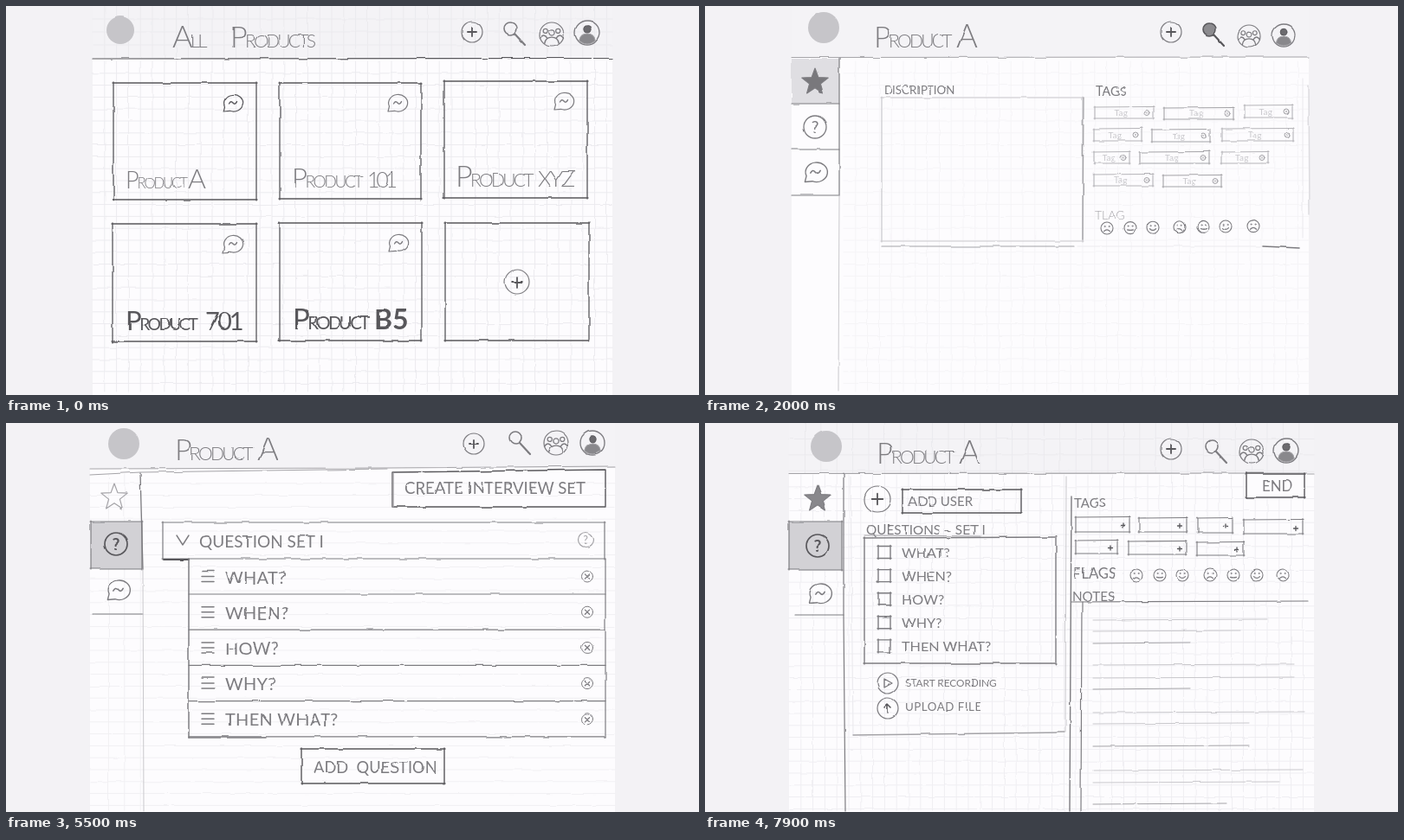
An HTML page for the animation above (8000 ms loop, 800 by 450 pixels).

```html
<!DOCTYPE html>
<html lang="en">
<head>
<meta charset="utf-8">
<title>Product sketch walkthrough</title>
<style>
html, body { margin: 0; width: 100%; height: 100%; overflow: hidden; background: #f3f2f5; }
svg { position: absolute; left: 0; top: 0; width: 800px; height: 450px; }
text { font-family: Lato, "Open Sans", sans-serif; white-space: pre; }
path, circle, ellipse { stroke-linecap: round; stroke-linejoin: round; }
.scene { visibility: hidden; }
</style>
</head>
<body>
<svg id="stage" viewBox="0 0 800 450" xmlns="http://www.w3.org/2000/svg"></svg>
<script>
const LOOP = 8000;
const INK = '#7d7c80', DARK = '#58575b', SOFT = '#a4a3a7', FAINT = '#c9c8cc', GRID = '#ecebef';

// Drawing helpers, each returning SVG markup
const path = (d, c = INK, w = 1.2, fill = 'none') =>
  `<path d="${d}" stroke="${c}" stroke-width="${w}" fill="${fill}"/>`;
const line = (x1, y1, x2, y2, c, w) => path(`M${x1} ${y1}L${x2} ${y2}`, c, w);
const ring = (x, y, r, c = INK, w = 1.2, fill = 'none') =>
  `<circle cx="${x}" cy="${y}" r="${r}" stroke="${c}" stroke-width="${w}" fill="${fill}"/>`;
const fillRect = (x1, y1, x2, y2, c) => `<path d="M${x1} ${y1}H${x2}V${y2}H${x1}Z" fill="${c}"/>`;
const at = (x, y, body, s = 1) => `<g transform="translate(${x} ${y}) scale(${s})">${body}</g>`;
const text = (x, y, size, str, c = INK, weight = 400, gap = 0) =>
  `<text x="${x}" y="${y}" font-size="${size}" fill="${c}" font-weight="${weight}" letter-spacing="${gap}em">${str}</text>`;

// Box with slightly overshooting corners; `tilt` lifts the right side
const box = (x1, y1, x2, y2, c = INK, w = 1.2, tilt = 0) =>
  path(`M${x1 - 1} ${y1}L${x2 + 1} ${y1 - tilt}M${x2} ${y1 - tilt - 1}L${x2} ${y2 + 1}` +
       `M${x2 + 1} ${y2}L${x1 - 1} ${y2}M${x1} ${y2 + 1}L${x1} ${y1 - 1}`, c, w);

const caps = (x, y, size, first, rest, c = INK, weight = 300) =>
  text(x, y, size, `${first}<tspan font-size="${size * 0.62}">${rest}</tspan>`, c, weight, -0.08);

const grid = (x1, y1, x2, y2, dx, dy, c = GRID) => {
  let d = '';
  if (dx) for (let x = x1 + dx; x < x2; x += dx) d += `M${x.toFixed(1)} ${y1}V${y2}`;
  if (dy) for (let y = y1 + dy; y < y2; y += dy) d += `M${x1} ${y.toFixed(1)}H${x2}`;
  return path(d, c, 1);
};

// Icons
const cross = (x, y, r, c, w) => path(`M${x - r} ${y}h${2 * r}M${x} ${y - r}v${2 * r}`, c, w);
const plus = (x, y, r, c = INK) => ring(x, y, r, c) + cross(x, y, r * 0.42, DARK, 1.8);
const remove = (x, y, r, c = INK) =>
  ring(x, y, r, c, 1) + at(x, y, path('M-1 -1L1 1M1 -1L-1 1', c, 0.5), r * 0.4);
const query = (x, y, r, c = INK, w = 1.2, weight = 400) =>
  ring(x, y, r, c, w) +
  `<text x="${x}" y="${y + r * 0.55}" font-size="${r * 1.5}" text-anchor="middle" fill="${c}" font-weight="${weight}">?</text>`;
const bubble = (x, y, c = INK, s = 1) => at(x, y,
  path('M-11 10L-9.5 4A11 9.8 0 1 1 -3.5 9.3Z', c, 1.2) + path('M-4.5 1q2.2 -4 4.5 -1t4.5 -1.4', c, 1.4), s);
const lens = (x, y, c = INK, fill = 'none') =>
  ring(x, y, 7, c, 1.6, fill) + path(`M${x + 5} ${y + 6}l12 13`, c, 2.2);
const star = (x, y, r, c, fill = 'none') => {
  let d = '';
  for (let i = 0; i < 10; i++) {
    const a = i * Math.PI / 5 - Math.PI / 2, q = i % 2 ? r * 0.42 : r;
    d += (i ? 'L' : 'M') + (x + q * Math.cos(a)).toFixed(1) + ' ' + (y + q * Math.sin(a)).toFixed(1);
  }
  return path(d + 'Z', c, 1.2, fill);
};
const group = (x, y, r) => at(x, y,
  ring(0, 0, 13.5) + ring(0, -2, 3) + ring(-7, -4, 2.5) + ring(7, -4, 2.5) +
  path('M-8 10q1 -7 8 -7t8 7M-13 4q4 -6 8 0M13 4q-4 -6 -8 0', INK, 1.4), r / 13.5);
const person = (x, y, r) => at(x, y,
  ring(0, 0, 13.5, INK, 1.3) + ring(0, -4, 4, DARK, 1, '#6c6b6f') +
  path('M-9 9q1 -8 9 -8t9 8q-9 7 -18 0z', SOFT, 1, '#89888c'), r / 13.5);
const face = (x, y, mood, c = INK) => at(x, y,
  ring(0, 0, 7, c, 1.1) + ring(-2.5, -2, 0.6, c, 0.8) + ring(2.5, -2, 0.6, c, 0.8) +
  path(`M-3.5 ${2.6 - mood}q3.5 ${mood * 3.5} 7 0`, c, 1.3));
const faces = (xs, y, slope = 0) =>
  xs.map((x, i) => face(x, y + slope * i, [-1, 0.3, 1][i % 3])).join('');
const tag = (x1, y1, x2, y2, c, mark) => box(x1, y1, x2, y2, c, 1.1, 0.5) + mark(x2 - 8, (y1 + y2) / 2);

// Header items: [x, y] for plus, search, group and profile
const tools = (p, s, g, u, r, lensFill) =>
  plus(...p, 12) + lens(...s, lensFill ? DARK : INK, lensFill) + group(...g, r) + person(...u, r);
const badge = (x, y, r) => `<circle cx="${x}" cy="${y}" r="${r}" fill="#c6c5c9"/>`;
const productTitle = (x, y) => caps(x, y, 34, 'P', 'RODUCT') + text(x + 95, y, 38, 'A', INK, 300);
const sideBar = (x, y, active, [starX, starY], [qx, qy], [bx, by], end, starFill) =>
  active + star(starX, starY, 16, starFill ? INK : SOFT, starFill) +
  query(qx, qy, 13, DARK, 1.7, 700) + bubble(bx, by, INK, 1.15) + line(x + 3, end, y, end, INK, 1.2);

function overview() {
  const cards = [
    [124, 89, 289, 224, 27, 'A', 210, 32, 0], [316, 89, 479, 223, 31, '101', 417, 25, -0.17],
    [506, 87, 671, 222, 34, 'XYZ', 614, 26, -0.08], [123, 252, 289, 388, 31, '701', 230, 29, -0.1],
    [316, 251, 480, 387, 33, 'B5', 425, 32, 0]];
  const left = [138, 330, 519, 138, 331];
  return grid(100, 64, 700, 446, 13.8, 13.8) +
    grid(100, 0, 700, 60, 13.8, 15, '#ebeaee') +
    line(100, 61, 700, 60.5, DARK, 1.2) + badge(132, 28, 16) +
    caps(192, 48, 36, 'A', 'LL', INK, 300) + caps(259, 48, 34, 'P', 'RODUCTS') +
    tools([538, 30], [582, 26], [630, 33], [671, 31], 14) +
    cards.map(([x1, y1, x2, y2, size, name, nx, ns, gap], i) => {
      const c = i > 2 ? DARK : INK, weight = i > 2 ? 400 : 300;
      const y = y2 - 13;
      return box(x1, y1, x2, y2, DARK, 1.3) + bubble(x2 - 27, y1 + 23, i ? INK : DARK) +
        caps(left[i], y, size, 'P', 'RODUCT', c, weight) +
        text(nx, y, ns, name, c, i === 4 ? 700 : weight, gap);
    }).join('') +
    box(507, 251, 673, 387, DARK, 1.3) + plus(590, 319, 14);
}

function details() {
  const mark = (x, y) => remove(x + 1, y, 3, SOFT);
  const tags = [
    [450, 117, 517, 130], [530, 118, 610, 131], [623, 115, 678, 129],
    [449, 142, 504, 156], [516, 143, 583, 157], [597, 142, 679, 156],
    [449, 169, 490, 182], [502, 169, 582, 182], [596, 169, 650, 182],
    [449, 195, 517, 208], [529, 196, 596, 209]];
  return grid(160, 64, 697, 446, 13.8, 13.8, '#f5f4f7') +
    line(100, 59.5, 697, 59, SOFT, 1) + badge(137, 25, 18) + productTitle(195, 48) +
    tools([538, 30], [582, 27], [628, 35], [668, 34], 13, '#8c8b8f') +
    fillRect(100, 61, 155, 113, '#dfdee2') + star(127, 88, 16, INK, '#79787c') +
    query(127, 140, 13, INK, 1.3) + bubble(128, 192, INK, 1.15) +
    [113, 166, 219].map(y => line(100, y, 155, y, INK, 1.1)).join('') +
    line(155, 60, 155, 219, INK, 1.2) + line(155, 219, 154, 445, FAINT, 1) +
    text(206, 102, 13.3, 'DISCRIPTION', INK, 400) +
    box(204, 106, 436, 272, FAINT, 1.2) + line(437, 106, 436, 270, SOFT, 1.3) +
    line(204, 278, 426, 278, SOFT, 1.2) + line(430, 278, 645, 278, GRID, 1) + line(645, 278, 686, 280, INK, 1.6) +
    text(451, 104, 14.5, 'TAGS', INK, 400) +
    tags.map(([x1, y1, x2, y2], i) => tag(x1, y1, x2, y2, i % 3 === 1 ? SOFT : '#b5b4b8', mark) +
      text((x1 + x2) / 2 - 11, y2 - 3, 10, 'Tag', FAINT, 400, 0.03)).join('') +
    text(450, 247, 14, 'TLAG', SOFT, 300) + faces([464, 491, 517, 548, 575, 601, 633], 257, -0.4) +
    line(690, 84, 690, 268, '#e9e8ec', 1) + line(697, 92, 698, 240, '#dddce0', 1.5);
}

const activeCell = (x1, y1, x2, y2) =>
  fillRect(x1, y1, x2, y2, '#d2d1d5') + box(x1, y1, x2, y2, INK, 1.2);

function questionSets() {
  return grid(98, 60, 702, 222, 18.4, 18.4) + grid(98, 0, 702, 57, 18.4, 18.4, '#ebeaee') +
    grid(162, 214, 702, 448, 0, 13.8, '#e8e7eb') +
    line(98, 57, 702, 58.5, INK, 1.1) + badge(136, 22, 18) + productTitle(195, 46) +
    tools([539, 29], [586, 23], [633, 30], [675, 29], 14) +
    sideBar(101, 160, activeCell(100, 114, 158, 172), [125, 84], [129, 142], [133, 197], 225) +
    path('M156 58L159 172L163 449', SOFT, 1.2) + line(156, 58, 159, 172, INK, 1.4) +
    path('M445 62L690 58L690 102L445 102Z', DARK, 1.5) + line(447, 64, 447, 101, SOFT, 1.2) +
    text(460, 89, 18.4, 'CREATE INTERVIEW SET', INK, 400) +
    path('M181 117L685 114L684 156L181 156Z', INK, 1.3) + line(181, 156, 684, 156, DARK, 1.3) +
    path('M196 130L204 137L196 144', DARK, 2) + text(211, 143, 17, 'QUESTION SET I', INK, 400) + query(665, 135, 8.5) +
    path('M184 169L688 174L688 214L184 212Z', INK, 1.3) +
    path('M198 184L207 191L198 199', DARK, 1.5) +
    text(213, 200, 18.2, 'QUESTION SET <tspan font-weight="700">2</tspan>', INK, 400) +
    query(668, 194, 9, INK, 1.4, 700) + ring(535, 171, 0.6, DARK) + ring(567, 214, 0.6, DARK);
}

const QUESTIONS = ['WHAT?', 'WHEN?', 'HOW?', 'WHY?', 'THEN WHAT?'];

function openSet() {
  const rows = QUESTIONS.map((q, i) => {
    const y = 177.5 + i * 41.2;
    return [-6, 0, 6].map(d => line(226, y + d, 240, y + d, INK, 1.5)).join('') +
      text(253, y + 8, 20, q, INK, 400, 0.015) + remove(671, y, 6.5) +
      line(211, y + 20.5, 692, y + 20.5, INK, 1.2);
  }).join('');
  return grid(97, 56, 703, 448, 0, 13.8, '#f1f0f3') + grid(100, 60, 157, 448, 18.4, 0, '#f1f0f3') +
    path('M97 53L440 52L703 50', SOFT, 1.1) + path('M97 60L155 57L440 53', SOFT, 1) +
    badge(136, 24, 18) + productTitle(195, 43) +
    tools([540, 24], [588, 17], [635, 23], [677, 23], 14) +
    sideBar(97, 158, activeCell(98, 114, 157, 169), [125, 86], [127, 140], [130, 193], 221) +
    line(155, 58, 158, 169, INK, 1.3) + line(158, 169, 159, 449, FAINT, 1) +
    path('M446 57L692 54L692 97L446 97Z', DARK, 1.4) + line(447, 58, 447, 97, SOFT, 1.5) +
    text(460, 82, 18.6, 'CREATE INTERVIEW SET', INK, 400) +
    box(181, 115, 691, 157, INK, 1.2) + line(182, 158, 211, 158, DARK, 1.8) +
    path('M197 130L204 141L211 130', INK, 1.4) + text(223, 144, 19, 'QUESTION SET I', INK, 400) +
    query(669, 135, 8.5, SOFT) + rows +
    line(211, 157, 211, 364, INK, 1.5) + line(692, 157, 692, 363, INK, 1.2) + line(211, 364, 300, 364, INK, 1.6) +
    box(341, 377, 506, 417, DARK, 1.4) + text(355, 405, 18.3, 'ADD  QUESTION', INK, 400);
}

function interview() {
  const mark = (x, y) => cross(x, y + 1, 2.5, DARK, 1.3);
  const tags = [
    [428, 109, 490, 126], [502, 110, 556, 126], [569, 110, 609, 127], [622, 112, 690, 128],
    [428, 136, 476, 151], [489, 137, 555, 152], [568, 138, 622, 153]];
  const notes = [
    [227, 648], [240, 618], [254, 560], [279, 680], [294, 680], [307, 560],
    [334, 692], [347, 628], [373, 628], [401, 690], [415, 662], [440, 602]];
  return grid(97, 60, 703, 448, 13.8, 13.8, '#efeef2') + grid(97, 0, 703, 58, 18.4, 18.4, '#ebeaee') +
    line(97, 58.5, 703, 58, SOFT, 1.2) + badge(140, 27, 18) + productTitle(198, 47) +
    tools([538, 30], [585, 27], [631, 33], [671, 32], 14) +
    sideBar(101, 160, activeCell(97, 114, 158, 170), [130, 88], [130, 142], [133, 197], 222, '#89888c') +
    path('M160 58L160 222L162 449', INK, 1.2) +
    plus(199, 88, 15) + box(228, 77, 365, 104, DARK, 1.4) + text(235, 96, 15, 'ADD USER', INK, 400) +
    text(186, 129, 15.3, 'QUESTIONS – SET I', INK, 400) + line(184, 130, 318, 131, SOFT, 1) +
    box(184, 133, 405, 278, INK, 1.4, 1) +
    QUESTIONS.map((q, i) => {
      const y = 149.5 + i * 27.1;
      return box(200, y - 7, 214, y + 7, INK, 1.4) + text(227, y + 6.5, 16.2, q, INK, 400);
    }).join('') +
    ring(211, 301, 12) + path('M207 296L216 301L207 306Z', INK, 1.4) +
    text(231, 305, 11.8, 'START RECORDING', INK, 400) +
    ring(211, 330, 12) + path('M211 335V325M207 329L211 325L215 329', DARK, 1.6) +
    text(231, 333, 13.3, 'UPLOAD FILE', INK, 400, 0.04) +
    line(168, 62, 171, 361, GRID, 1.2) + line(171, 361, 415, 358, SOFT, 1.4) + line(417, 62, 416, 358, FAINT, 1) +
    line(423, 85, 421, 449, INK, 1.4) + line(435, 207, 434, 449, INK, 1.2) +
    fillRect(625, 59, 692, 86, '#fdfcfe') + box(625, 59, 692, 86, DARK, 1.4) + text(643, 79, 16.8, 'END', INK, 400) +
    text(426, 98, 15, 'TAGS', INK, 400) + tags.map(t => tag(...t, INK, mark)).join('') +
    text(425, 180, 16.6, 'FLAGS', INK, 400) + faces([498, 525, 551, 583, 610, 637, 667], 176) +
    text(424, 206, 15.2, 'NOTES', INK, 400) + line(423, 207, 696, 206, INK, 1.2) +
    notes.map(([y, x], i) => line(448, y + 1, x, y, i % 3 === 2 ? SOFT : FAINT, 1)).join('');
}

// [start ms, paper left, paper right, header height, drawing]
const scenes = [
  [0, 100, 700, 60, overview],
  [500, 100, 697, 59, details],
  [3000, 98, 702, 57, questionSets],
  [5500, 97, 703, 52, openSet],
  [7900, 97, 703, 58, interview]
];

const stage = document.getElementById('stage');
stage.innerHTML =
  `<filter id="hand" filterUnits="userSpaceOnUse" x="0" y="0" width="800" height="450" color-interpolation-filters="sRGB">
    <feTurbulence type="fractalNoise" baseFrequency="0.045" numOctaves="2" seed="4" result="n"/>
    <feDisplacementMap in="SourceGraphic" in2="n" scale="2.6" xChannelSelector="R" yChannelSelector="G"/>
  </filter>` +
  scenes.map(([, x1, x2, head, draw]) =>
    `<g class="scene">${fillRect(x1, 0, x2, 450, '#fdfcfe')}${fillRect(x1, 0, x2, head, '#f4f3f6')}
     <g filter="url(#hand)">${draw()}</g></g>`).join('');

stage.querySelectorAll('.scene').forEach((el, i) => {
  const from = scenes[i][0] / LOOP;
  const to = i + 1 < scenes.length ? scenes[i + 1][0] / LOOP : 1;
  const key = (visibility, offset) => ({ visibility, offset, easing: 'step-end' });
  el.animate([key('hidden', 0), key('visible', from), key('hidden', to), key('hidden', 1)],
    { duration: LOOP, iterations: Infinity });
});
</script>
</body>
</html>
```
